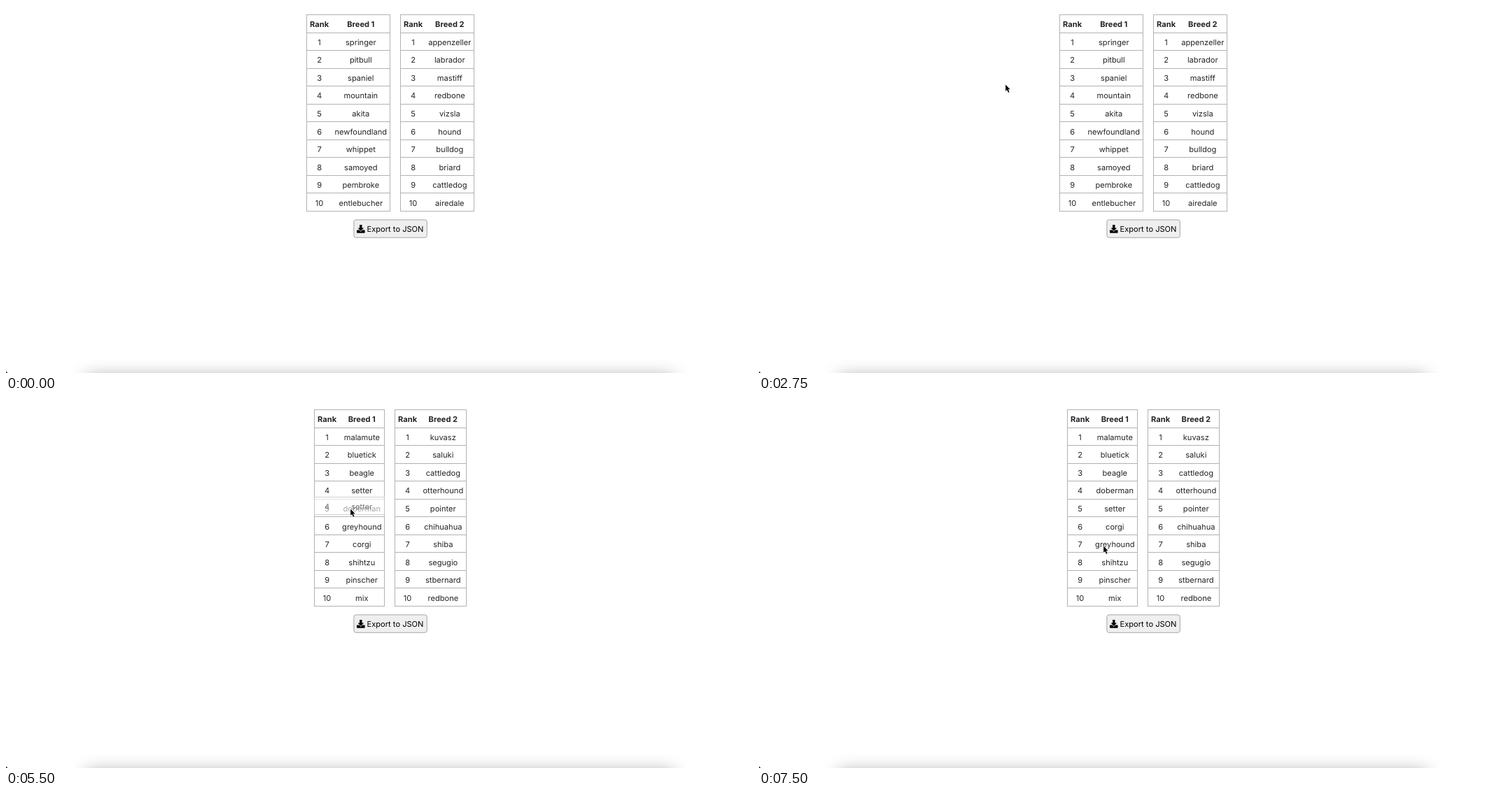
Recreate the animation shown at these times as an HTML page with a canvas. Size 1067 px wide and 525 px high, loop 8000 ms.

```html
<!DOCTYPE html>
<html lang="en">
<head>
<meta charset="utf-8">
<title>Breed ranking</title>
<style>
html, body { margin: 0; width: 100%; height: 100%; overflow: hidden; background: #fff; }
canvas { display: block; }
</style>
</head>
<body>
<canvas id="stage" width="1067" height="525"></canvas>
<script>
const ctx = document.getElementById('stage').getContext('2d');
const LOOP = 8000, TICK = 250;
const FONT = '11.1px Inter, Roboto, sans-serif';
const INK = '#212529', LINE = '#b2b2b2';

const table = (title, left, right, names) => ({
  title, left, right,
  rank: left + 18.6,
  name: (left + right) / 2 + 17.8,
  rows: names.split(' ')
});

const firstPage = [
  table('Breed 1', 429, 549, 'springer pitbull spaniel mountain akita newfoundland whippet samoyed pembroke entlebucher'),
  table('Breed 2', 563, 669, 'appenzeller labrador mastiff redbone vizsla hound bulldog briard cattledog airedale')
];
const nextPage = [
  table('Breed 1', 440, 541, 'malamute bluetick beagle setter doberman greyhound corgi shihtzu pinscher mix'),
  table('Breed 2', 555, 658, 'kuvasz saluki cattledog otterhound pointer chihuahua shiba segugio stbernard redbone')
];

// Pointer path; ease is the power of the curve leading to each key
const path = [
  { t: 1000, x: 510, y: 32 },
  { t: 1250, x: 498, y: 52 },
  { t: 2250, x: 498, y: 83, ease: 1.6 },
  { t: 2750, x: 351, y: 111, ease: 6 },
  { t: 4000, x: 351, y: 111 },
  { t: 4250, x: 467, y: 111 },
  { t: 5000, x: 491, y: 130, ease: 0.4 },
  { t: 5250, x: 492, y: 153 },
  { t: 6000, x: 490, y: 153 },
  { t: 6500, x: 492, y: 180, ease: 0.6 },
  { t: 7000, x: 491, y: 206, ease: 0.6 }
];

// Each drag moves a row one place down
const drags = [
  { from: 5250, drop: 5750, row: 4, grabX: 491, grabY: 130 },
  { from: 6750, drop: 7250, row: 6, grabX: 491, grabY: 180 }
];

const lineY = i => Math.floor(12.5 + 25.54 * i);
const baseY = i => Math.round(30.25 + 25.55 * i);

function pointerAt(t) {
  const next = path.findIndex(k => k.t > t);
  if (next === 0) return null;
  if (next < 0) return path[path.length - 1];
  const a = path[next - 1], b = path[next];
  const u = ((t - a.t) / (b.t - a.t)) ** (b.ease || 1);
  return { x: Math.round(a.x + (b.x - a.x) * u), y: Math.round(a.y + (b.y - a.y) * u) };
}

function text(s, x, y, color = INK, weight = 400, align = 'center') {
  ctx.font = `${weight} ${FONT}`;
  ctx.textRendering = 'geometricPrecision';
  ctx.textAlign = align;
  ctx.fillStyle = color;
  ctx.fillText(s, x, y);
}

function poly(points, fill) {
  ctx.beginPath();
  points.forEach(([x, y]) => ctx.lineTo(x, y));
  ctx.closePath();
  ctx.fillStyle = fill;
  ctx.fill();
}

function drawRow(t, rank, name, i, weight) {
  text(rank, t.rank, baseY(i), INK, weight);
  text(name, t.name, baseY(i), INK, weight);
}

function drawTable(t, rows) {
  ctx.fillStyle = LINE;
  for (let i = 0; i <= 11; i++) ctx.fillRect(t.left, lineY(i), t.right - t.left, 1);
  for (const x of [t.left, t.right - 1]) ctx.fillRect(x, 12, 1, 282);
  drawRow(t, 'Rank', t.title, 0, 700);
  rows.forEach((name, i) => drawRow(t, i + 1, name, i + 1));
}

function drawGhost(t, rows, drag, at) {
  const top = lineY(drag.row), width = t.right - t.left;
  ctx.save();
  ctx.translate(at.x - drag.grabX, at.y - drag.grabY);
  ctx.globalAlpha = 0.6;
  ctx.fillStyle = '#fff';
  ctx.fillRect(t.left, top, width, 26);
  ctx.strokeStyle = LINE;
  ctx.lineWidth = 1;
  ctx.strokeRect(t.left + 0.5, top + 0.5, width - 1, 25);
  drawRow(t, drag.row, rows[drag.row - 1], drag.row);
  ctx.restore();
}

function drawButton() {
  ctx.beginPath();
  ctx.roundRect(496.9, 305.9, 104.4, 25.4, 3);
  ctx.fillStyle = '#efefef';
  ctx.fill();
  ctx.strokeStyle = '#9c9c9c';
  ctx.lineWidth = 0.9;
  ctx.stroke();

  // Tray, then the arrow with a light gap around its tip
  ctx.beginPath();
  ctx.roundRect(501, 320.4, 11.6, 4.3, 0.7);
  ctx.fillStyle = '#000';
  ctx.fill();
  poly([[502.6, 317.8], [511, 317.8], [506.8, 323]], '#efefef');
  poly([[505.1, 313], [508.5, 313], [508.5, 317.4], [511, 317.4],
    [506.8, 322], [502.6, 317.4], [505.1, 317.4]], '#000');
  text('Export to JSON', 515.6, 323, '#000', 400, 'left');
}

function drawBottomShadow() {
  ctx.save();
  ctx.shadowColor = 'rgba(0,0,0,0.4)';
  ctx.shadowBlur = 26;
  ctx.shadowOffsetY = -200;
  ctx.fillStyle = '#000';
  ctx.beginPath();
  ctx.roundRect(112, 731, 844, 120, 12);
  ctx.fill();
  ctx.restore();
  poly([[0, 522.5], [2.5, 525], [0, 525]], '#222');
}

function drawPointer({ x, y }) {
  const arrow = [[0, 0], [0, 9.8], [2.2, 7.8], [4, 11.9], [5.7, 11.2], [3.9, 7.1], [6.8, 7]];
  ctx.save();
  ctx.translate(x + 1.2, y + 1.6);
  ctx.scale(0.94, 0.94);
  ctx.lineJoin = 'round';
  ctx.lineWidth = 1.4;
  ctx.strokeStyle = '#fff';
  poly(arrow, '#000');
  ctx.stroke();
  poly(arrow, '#000');
  ctx.restore();
}

function draw(t) {
  ctx.fillStyle = '#fff';
  ctx.fillRect(0, 0, 1067, 525);
  drawBottomShadow();

  const [a, b] = t < 3500 ? firstPage : nextPage;
  const rows = a.rows.slice();
  for (const { drop, row } of drags) {
    if (t >= drop) [rows[row - 1], rows[row]] = [rows[row], rows[row - 1]];
  }
  drawTable(a, rows);
  drawTable(b, b.rows);
  drawButton();

  const at = pointerAt(t);
  if (!at) return;
  const drag = drags.find(d => t >= d.from && t < d.drop);
  if (drag) drawGhost(a, rows, drag, at);
  drawPointer(at);
}

const start = performance.now();
function tick(now) {
  const t = Math.max(0, now - start) % LOOP;
  draw(Math.floor(t / TICK) * TICK);
  requestAnimationFrame(tick);
}
draw(0);
requestAnimationFrame(tick);
</script>
</body>
</html>
```
